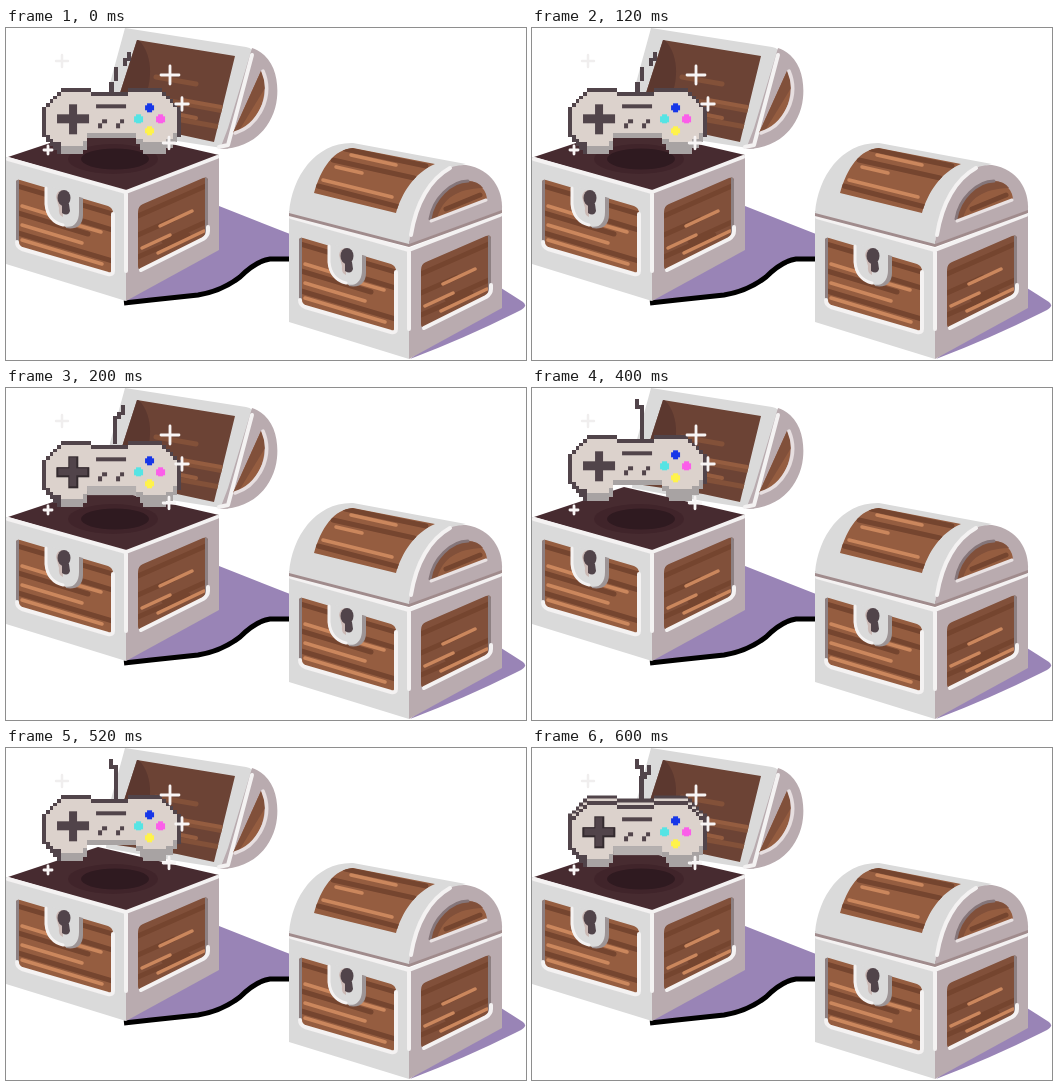
Write an HTML page that moves like this. It is 520 px wide and 332 px high and loops after 800 ms.

```html
<!DOCTYPE html>
<html lang="en">
<head>
<meta charset="utf-8">
<title>Treasure chests</title>
<style>
html, body { margin: 0; width: 100%; height: 100%; overflow: hidden; background: #fff; }
svg { display: block; width: 520px; height: 332px; }
.light { fill: #dadada; }
.side { fill: #b9abaf; }
.wood { fill: #955d40; }
.deep { fill: #81503a; }
.dark { fill: #6c4335; }
.ink { fill: #51444a; }
.skin { fill: #dcd2cc; }
.shade { fill: #a8a3a3; }
.purple { fill: #9984b6; }
.line { fill: none; stroke-linecap: round; stroke-linejoin: round; }
.white { stroke: #f4f2f2; stroke-width: 4; }
.grain { stroke: #75452f; stroke-width: 5; }
.glow { stroke: #cb875d; stroke-width: 3.5; }
.rim { stroke: #8d8082; stroke-width: 4; }
.pad { animation: bob .8s step-end infinite; }
.tilt { animation: tilt .4s step-end infinite; }
.quarter { opacity: 0; animation: show .8s step-end infinite; }
.q2 { animation-delay: -.6s; }
.q3 { animation-delay: -.4s; }
.q4 { animation-delay: -.2s; }
@keyframes bob {
  0% { transform: translateY(0); }
  25%, 75% { transform: translateY(-7px); }
  50% { transform: translateY(-13px); }
}
@keyframes tilt { 0% { opacity: 0; } 50%, 100% { opacity: 1; } }
@keyframes show { 0% { opacity: 1; } 25%, 100% { opacity: 0; } }
</style>
</head>
<body>
<svg viewBox="0 0 520 332">
<defs>
  <clipPath id="front"><path d="M14 152L102 178Q107 180 107 185V243Q107 249 102 247L15 221Q10 219 10 213V155Q10 151 14 152Z"/></clipPath>
  <clipPath id="flank"><path d="M137 176L197 150Q202 148 202 153V203Q202 208 197 211L137 241Q132 243 132 238V184Q132 178 137 176Z"/></clipPath>
  <clipPath id="inner"><path d="M131 12L229 28L208 114L171 106L104 96Z"/></clipPath>
  <clipPath id="vault"><path d="M308 165C315 140 328 121 347 120L429 136C408 145 396 165 390 185Z"/></clipPath>

  <g id="box">
    <path class="light" d="M0 129L120 163V273L0 236Z"/>
    <path class="side" d="M120 163L213 128V222L120 273Z"/>
    <g clip-path="url(#front)">
      <path class="wood" d="M0 130H120V260H0Z"/>
      <path class="line grain" d="M8 157L110 187M12 185L82 206M70 191L110 203M12 205L110 234"/>
      <path class="line glow" d="M16 178L42 186M71 197L95 204M16 197L76 215M16 212L96 236"/>
      <path class="line rim" d="M11 148V213"/>
    </g>
    <path class="line white" d="M11 214Q11 219 16 221L102 246Q107 247 107 243V186" stroke-width="3"/>
    <g clip-path="url(#flank)">
      <path class="deep" d="M125 140H210V250H125Z"/>
      <path class="line grain" d="M132 188L202 157M132 207L168 191M158 213L202 193M132 229L182 207"/>
      <path class="line glow" d="M154 198L186 183M136 220L164 207M152 225L198 203"/>
      <path class="line rim" d="M201 150V206"/>
    </g>
    <path class="line white" d="M135 242L197 211Q202 208 202 203V199"/>
    <path class="line white" d="M2 131L120 164L211 129M120 164V243"/>
    <path fill="#9d9495" d="M47 162L77 170V187C77 198 69 202 60 200Z"/>
    <path class="light" d="M39 157L73 167V184C73 196 66 201 57 198C46 195 39 187 39 176Z"/>
    <path class="line white" d="M40 160V176C41 187 47 195 57 197" style="stroke-width:3"/>
    <path fill="#cbb9b5" d="M50 169Q51 162 57 162V189Q52 187 53 180Z"/>
    <ellipse class="ink" cx="58" cy="170" rx="6.5" ry="8"/>
    <path class="ink" d="M56 174L63 176L64 183Q62 189 56 185Z"/>
  </g>

  <path id="spark" class="line" d="M-9 0H9M0-9V9" stroke="#f8f5f5" stroke-width="2.8" vector-effect="non-scaling-stroke"/>
  <path id="dot" d="M-.7-1.2H.7V-.7H1.2V.7H.7V1.2H-.7V.7H-1.2V-.7H-.7Z"/>
  <path id="cord" class="ink" d="M115 17h4v10h-4v4h-4v25h-4v-28h4v-4h4z"/>
  <path id="stem" class="ink" d="M103 11h4v6h5v34h-4v-30h-5z"/>

  <g id="shell">
    <path class="ink" d="M5 0H13V1H23V0H32V1H33V2H34V3H35V4H36V5H37V13H36V14.5H35V16H33V17.5H27V16.5H26V15H25V13H12V16.5H11V17.5H4V16.5H3V15.5H2V14.5H1V13H0V5H1V4H2V3H3V2H4V1H5Z"/>
    <path class="skin" d="M5 1H13V2H23V1H32V2H33V3H34V4H35V5H36V12H35V13.5H33V14.5H27V13.5H25V12H12V14H11V15.5H5V14.5H3V13.5H2V12.5H1V5H2V4H3V3H4V2H5Z"/>
    <path class="shade" d="M12 12H25V13.3H12ZM5 15.5H11V14H12V16.5H11V17.5H5ZM25 13.5H27V14.5H33V13.5H35V12H36V14.5H35V16H33V17.5H27V16.5H26V15H25Z"/>
  </g>
</defs>

<!-- ground shadows -->
<path class="purple" d="M213 178L284 206V230H264Q250 232 237 244Q218 262 190 266L119 273L180 230Z"/>
<path fill="none" stroke="#000" stroke-width="5" d="M118 275L145 272L192 267Q216 263 234 249Q250 233 264 231H284"/>
<path class="purple" d="M495 260L517 274Q522 278 515 282Q462 309 404 331Z"/>

<!-- open lid -->
<path class="light" d="M119 0L240 19Q248 20 247 27L222 121L165 112L100 100L104 55Z"/>
<path class="side" d="M246 20C267 27 273 50 271 70C268 98 247 121 214 121L222 100Z"/>
<g clip-path="url(#inner)">
  <path class="dark" d="M90 0H240V125H90Z"/>
  <path class="line" stroke="#835139" stroke-width="5" d="M150 49L190 56M148 70L218 83M170 91L214 99"/>
  <path class="line" stroke="#955d40" stroke-width="4" d="M176 72L215 79M160 84L190 90"/>
  <path fill="#57352e" d="M128 8C145 20 147 45 141 63L100 104V60Z" opacity=".75"/>
</g>
<path class="line white" d="M246 27L222 117L213 119" stroke-width="3"/>
<path class="wood" d="M255 43C265 66 253 98 227 105Z"/>
<path class="deep" d="M255 43Q260 51 259 60L234 101L227 105Z"/>
<path class="line" stroke="#e7dfe0" stroke-width="3.5" d="M257 43C268 69 252 98 229 105"/>

<!-- open box -->
<path fill="#472b30" d="M2 129L92 99L213 127L120 163Z"/>
<ellipse cx="107" cy="131" rx="45" ry="15" fill="#40242a"/>
<ellipse cx="109" cy="131" rx="34" ry="10.5" fill="#2f1a20"/>
<use href="#box"/>

<!-- closed chest -->
<use href="#box" x="283" y="58"/>
<path fill="#a08b8c" d="M283 183L403 213L496 181V185L403 219L283 188Z"/>
<path class="light" d="M283 185C286 148 310 114 347 115L460 136C430 143 408 169 403 216Z"/>
<path class="side" d="M403 216C407 168 432 135 460 137C486 141 497 162 496 182Z"/>
<g clip-path="url(#vault)">
  <path class="wood" d="M300 110H440V190H300Z"/>
  <path class="line grain" d="M339 121L420 138M327 132L408 150M312 158L393 179"/>
  <path class="line glow" d="M345 127L390 137M330 139L356 145M317 152L386 169"/>
</g>
<path class="line white" d="M405 207C410 175 424 151 444 140"/>
<path class="wood" d="M424 193C427 171 445 153 462 153C475 154 481 164 481 172Z"/>
<path class="deep" d="M424 193C427 171 445 153 462 153Q472 153 477 160C451 161 437 170 431 190Z"/>
<path class="line" stroke="#85767a" stroke-width="3" d="M424 191C427 171 445 153 462 153"/>
<path class="line grain" d="M440 181L474 167"/>
<path class="line" stroke="#e9e2e3" stroke-width="3" d="M425 193L480 172"/>

<!-- cords -->
<path class="ink quarter" d="M121 24h4v9h-4v5h-4v-8h4zM108 39h4v14h-4v11h-5v-10h5z"/>
<use class="quarter q2" href="#cord"/>
<use class="quarter q3" href="#stem"/>
<g class="quarter q4"><use href="#stem"/><use href="#cord"/></g>

<!-- gamepad -->
<g class="pad"><g transform="translate(36 60) scale(3.757)" shape-rendering="crispEdges">
  <g class="quarter q4"><use href="#shell" y="-1.6"/></g>
  <use href="#shell"/>
  <path class="tilt" fill="#b5b0af" d="M12 12H25V14.3H12Z"/>
  <path class="ink" d="M14.3 4.2H22.4V5.3H14.3ZM16 8.4H17.2V9.5H16ZM14.9 9.5H16V10.6H14.9ZM20.8 8.4H21.9V9.5H20.8ZM19.6 9.5H20.8V10.6H19.6Z"/>
  <path id="cross" class="ink" d="M7.1 4.2H9.4V7.1H12.4V9.4H9.4V12.4H7.1V9.4H4.1V7.1H7.1Z"/>
  <use class="tilt" href="#cross" stroke="#332a2e" stroke-width=".45"/>
  <use href="#dot" x="28.6" y="5.3" fill="#1636e8"/>
  <use href="#dot" x="25.6" y="8.3" fill="#55e4e4"/>
  <use href="#dot" x="31.6" y="8.3" fill="#fb5ee9"/>
  <use href="#dot" x="28.6" y="11.3" fill="#fff34a"/>
</g></g>

<!-- sparkles -->
<use href="#spark" transform="translate(164 47)"/>
<use href="#spark" transform="translate(176 76) scale(.7)"/>
<use href="#spark" transform="translate(163 115) scale(.65)"/>
<use href="#spark" transform="translate(42 122) scale(.45)"/>
<path class="line" stroke="#f0eeee" stroke-width="2.5" d="M50 33H62M56 27V39"/>
</svg>
</body>
</html>
```
